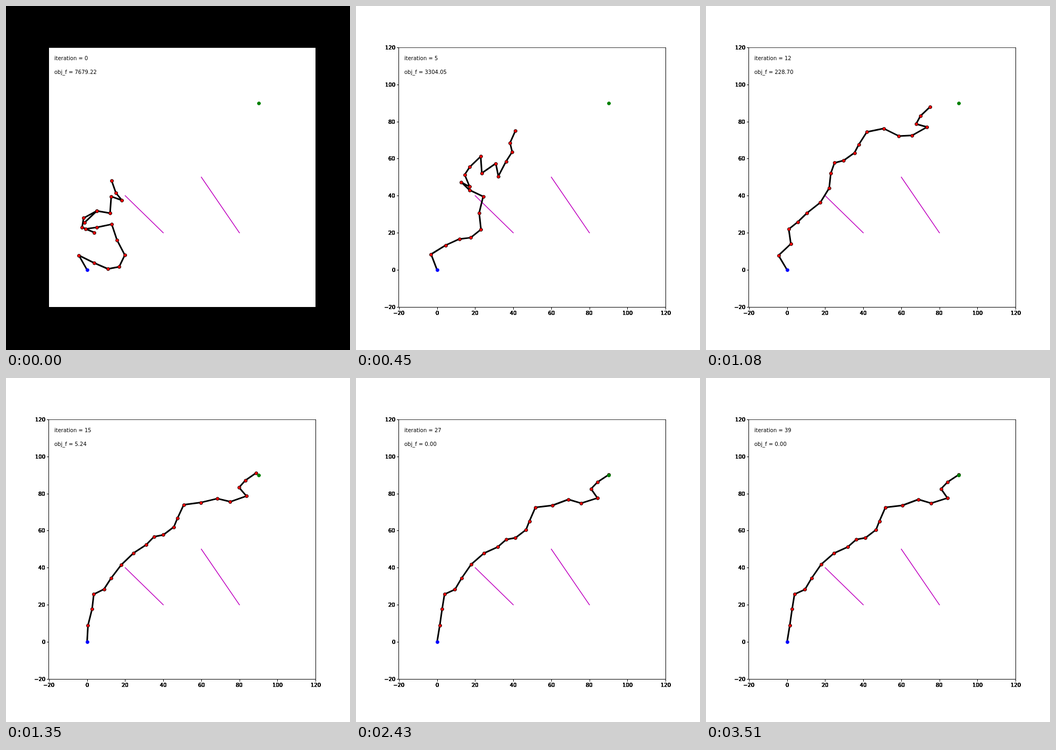
Write an HTML page with a canvas that moves like this. It is 648 px wide and 648 px high and loops after 3600 ms.

```html
<!DOCTYPE html>
<html>
<head>
<meta charset="utf-8">
<style>
  html, body { margin: 0; width: 100%; height: 100%; overflow: hidden; background: #fff; }
  canvas { display: block; }
</style>
</head>
<body>
<canvas id="stage" width="648" height="648"></canvas>
<script>
const ctx = document.getElementById('stage').getContext('2d');
const STEP = 90, COUNT = 40, SETTLE = 0.534;
const toX = v => 81 + (v + 20) * 502.2 / 140;
const toY = v => 567 - (v + 20) * 489.24 / 140;

// The arm is a chain of rigid links; a pose is the heading of each in degrees.
const lengths = [9, 9, 8, 6, 7, 9, 9, 8, 6, 5, 7, 5, 8, 9, 9, 7, 9, 6, 5, 7];
const poses = [
  { at: 1, objective: 7679.22, headings: [119, -27, -24, 11, 65, 117, 108, 192, 188, -23,
    156, 81, 29, 224, 44, -10, 86, -20, 129, 109] },
  { at: 9, objective: 1421.6, headings: [102, 92, 74, 3, 14, 75, 45, 116, 83, -35,
    68, 34, 60, -36, 27, 212, 40, 136, 77, 24] },
  { at: 12, objective: 228.7, headings: [120, 44, 98, 39, 45, 39, 59, 84, 71, 15,
    36, 63, 58, 12, -27, 3, 30, 164, 62, 44] },
  { at: 39, objective: 4e-13, headings: [81, 82, 81, 25, 60, 56, 42, 25, 42, 11,
    38, 69, 67, 7, 21, -17, 18, 124, 47, 34] },
];

function solve(iteration) {
  const n = Math.max(1, iteration);
  const next = Math.max(1, poses.findIndex(p => p.at >= n));
  const a = poses[next - 1], b = poses[next];
  const linear = (n - a.at) / (b.at - a.at);
  const k = next === poses.length - 1 ? 1 - SETTLE ** (n - a.at) : linear;
  let x = 0, y = 0;
  const joints = [[toX(x), toY(y)]];
  lengths.forEach((length, i) => {
    const from = a.headings[i];
    const turn = (b.headings[i] - from + 540) % 360 - 180;
    const angle = (from + turn * k) * Math.PI / 180;
    x += length * Math.cos(angle);
    y += length * Math.sin(angle);
    joints.push([toX(x), toY(y)]);
  });
  return { joints, objective: a.objective * (b.objective / a.objective) ** linear };
}

function polyline(points, color, width) {
  ctx.beginPath();
  points.forEach(([x, y]) => ctx.lineTo(x, y));
  ctx.strokeStyle = color;
  ctx.lineWidth = width;
  ctx.stroke();
}

// Markers sit on pixel centres.
function dot([x, y], color, edge = color) {
  ctx.beginPath();
  ctx.arc(Math.round(x) + 0.5, Math.round(y) + 0.5, 3, 0, 2 * Math.PI);
  ctx.fillStyle = color;
  ctx.fill();
  ctx.strokeStyle = edge;
  ctx.lineWidth = 1;
  ctx.stroke();
}

// Repeated drawing hardens the soft edges of the glyphs.
function heavyText(text, x, y) {
  for (let i = 0; i < 12; i++) ctx.fillText(text, Math.round(x), y);
}

function drawAxes() {
  ctx.fillStyle = '#000';
  ctx.fillRect(80, 78, 1, 490);
  ctx.fillRect(583, 78, 1, 490);
  ctx.fillRect(80, 567, 504, 1);
  for (let v = -20; v <= 120; v += 20) {
    const label = String(v).replace('-', '\u2212');
    const width = ctx.measureText(label).width;
    const x = Math.round(toX(v)), y = Math.round(toY(v));
    ctx.fillRect(x, 568, 1, 4);
    ctx.fillRect(77, y, 4, 1);
    heavyText(label, toX(v) - width / 2, 582);
    heavyText(label, 74 - width, y + 4);
  }
}

function draw(iteration) {
  const { joints, objective } = solve(iteration);
  ctx.font = '10px "DejaVu Sans", sans-serif';
  ctx.lineJoin = 'round';
  ctx.lineCap = 'square';
  ctx.fillStyle = iteration ? '#fff' : '#000';
  ctx.fillRect(0, 0, 648, 648);
  ctx.fillStyle = '#fff';
  ctx.fillRect(81, 78, 502, 489);
  ctx.fillStyle = '#333';
  ctx.fillRect(81, 78, 502, 1);
  if (iteration) drawAxes();

  polyline([[toX(20), toY(40)], [toX(40), toY(20)]], '#bf00bf', 1.5);
  polyline([[toX(60), toY(50)], [toX(80), toY(20)]], '#bf00bf', 1.5);
  polyline(joints, '#000', 3);
  joints.slice(1).forEach(joint => dot(joint, '#f00', '#000'));
  dot(joints[0], '#00f');
  dot([toX(90), toY(90)], '#008000');

  ctx.fillStyle = '#000';
  ctx.fillText('iteration = ' + iteration, 91, 102);
  ctx.fillText('obj_f = ' + objective.toFixed(2), 91, 128);
}

function tick() {
  draw(Math.floor(performance.now() / STEP) % COUNT);
  requestAnimationFrame(tick);
}
tick();
</script>
</body>
</html>
```
